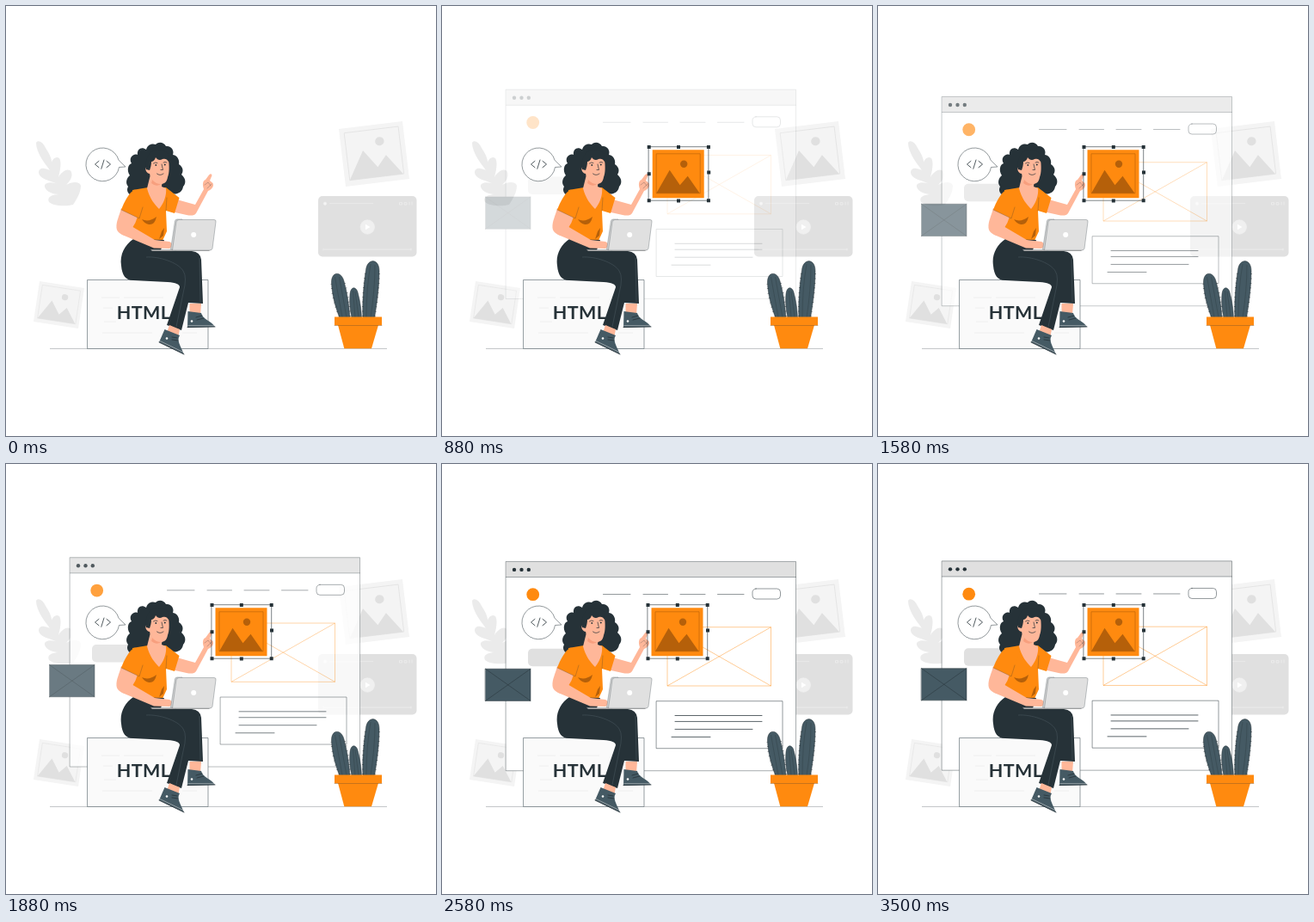
These frames come from a looping animation (500 by 500 pixels, 3540 ms). An HTML page:

```html
<!DOCTYPE html>
<html lang="en">
<head>
<meta charset="utf-8">
<title>Building a web page</title>
<style>
  html, body { margin: 0; width: 100%; height: 100%; overflow: hidden; background: #fff; }
  svg { display: block; width: 100%; height: 100%; }
  .ink { fill: none; stroke: #263238; stroke-width: .5; stroke-linecap: round; stroke-linejoin: round; }
  .dark { fill: #263238; }
  .slate { fill: #455a64; }
  .orange { fill: #ff8a0f; }
  .skin { fill: #ffb799; }
  .grey { fill: #e0e0e0; }
  .card { fill: #f4f4f4; color: #e0e0e0; }
</style>
</head>
<body>
<svg viewBox="0 0 500 500">
  <defs>
    <g id="photo">
      <path d="M0 0H60V56H0Z"/>
      <g fill="currentColor">
        <path d="M4.500 50.500L20 23.500L32 41L41 30.500L55 50.500Z"/>
        <circle cx="36.500" cy="16.500" r="4.200"/>
      </g>
      <path d="M4.500 4.500H55.500V50.500H4.500Z" fill="none" stroke="currentColor" stroke-width=".6"/>
    </g>
  </defs>

  <!-- background -->
  <use href="#photo" class="card" transform="matrix(1.233 -.15 .143 1.196 387 143)"/>
  <use href="#photo" class="card" transform="matrix(.867 .133 -.125 .84 39 320)"/>
  <path fill="#ebebeb" d="M35 159C37 155 43 158 46 165C51 173 55 180 52 186C53 178 58 174 62 177C65 182 63 191 61 199C66 191 73 188 76 193C78 199 74 204 70 208C77 204 86 204 87 209C87 217 82 225 78 231C70 233 56 233 50 228C47 222 54 219 62 219C52 219 44 214 45 208C48 204 55 205 60 207C51 203 39 201 38 194C38 187 45 188 51 191C46 184 35 171 35 159Z"/>
  <rect class="grey" x="363" y="221" width="114.500" height="70.500" rx="5"/>
  <g fill="#f5f5f5" stroke="#f0f0f0" stroke-width=".7">
    <circle cx="371" cy="229.700" r="1.700"/>
    <circle cx="420.300" cy="257" r="8.200" fill="#f0f0f0"/>
    <path d="M376 229.700H427M370 283H471M457.500 228.500h3v2.500h-3zM463 228.500h3v2.500h-3zM469 227.500v4M472 227.500v4M369 281.500v3M471 281.500v3" fill="none"/>
  </g>
  <path d="M418 253.800V260.200L423.500 257Z" fill="#fff"/>
  <path d="M51 398.500H443" stroke="#b5b9bb" stroke-width=".8"/>

  <!-- browser window -->
  <g id="page">
    <path d="M74.500 112.700H411.500V356H74.500Z" fill="#fff"/>
    <path class="grey" d="M74.500 112.700H411.500V130.800H74.500Z"/>
    <path class="ink" stroke-opacity=".8" d="M74.500 112.700H411.500V356H74.500ZM74.500 130.800H411.500"/>
    <g class="dark">
      <circle cx="84" cy="122.200" r="2.200"/>
      <circle cx="92.500" cy="122.200" r="2.200"/>
      <circle cx="100.800" cy="122.200" r="2.200"/>
    </g>
    <circle class="orange" cx="105.700" cy="151" r="7.400"/>
    <path class="ink" d="M187.500 150.800H219M234 150.800H262.500M277 150.800H306M320.500 150.800H351"/>
    <rect class="ink" x="361" y="144.300" width="32.500" height="12" rx="4"/>
    <rect class="grey" x="100" y="214" width="62" height="20.500" rx="5"/>
    <path d="M262 189H382.500V257.300H262ZL382.500 257.300M262 257.300L382.500 189" fill="none" stroke="#ff8a0f" stroke-width=".55" stroke-opacity=".8"/>
    <path class="ink" d="M249.500 275H396V330H249.500Z"/>
    <path class="ink" style="stroke-width:.75" d="M271 291.800H372M271 298.700H372M271 307.700H361M267 316.700H312"/>
    <path class="slate" d="M50.500 237.500H103V274.700H50.500Z"/>
    <path class="ink" d="M50.500 237.500H103V274.700H50.500ZL103 274.700M50.500 274.700L103 237.500"/>
  </g>

  <!-- seat -->
  <path d="M94.500 318.500H235V398.500H94.500Z" fill="#fafafa" stroke="#536067" stroke-width=".6"/>
  <path d="M111 339H132M137 339H183M113 351H124M114 367H128M112 380H170M205 380H222" stroke="#ececec" stroke-width=".8"/>
  <text class="dark" x="128.800" y="364.300" font-family="Lato, sans-serif" font-weight="700" font-size="21.500" letter-spacing=".4">HTML</text>

  <!-- cactus -->
  <g class="slate" stroke="#263238" stroke-width=".5">
    <path d="M415 363C414 345 416 322 418.500 307C420 293 434 293 434 308C434 328 431 347 428.500 363Z"/>
    <path d="M388 363C383 350 379 336 378.500 322C378 308 390 308 393 320C397 334 399 349 400 363Z"/>
    <path d="M402 363C400 353 399 344 400 335C401 325 408 326 409.500 335C412 344 413 353 413.500 363Z"/>
    <path fill="none" stroke-opacity=".6" d="M419 362Q419 328 424 300M424 362Q429 330 429 301M391 362L382.500 315M396 362L387.500 315M406 362L403.500 331M410 362L406 332"/>
    <path fill="none" stroke-width="2" stroke-dasharray=".5 5" d="M415 361Q414.500 332 418.500 307M428.700 361Q434 330 434 308M387.500 361Q379 340 378.500 323M400 361Q399 338 393 320"/>
  </g>
  <path class="orange" d="M386 371L393.300 398.300H425L433 371Z"/>
  <path class="orange" d="M382 361.500H437V371.500H382Z"/>
  <path class="ink" stroke-opacity=".5" d="M382 371.500H437"/>

  <!-- speech bubble -->
  <path class="ink" style="fill:#fff" d="M131 179A19.400 19.400 0 1 0 131.500 187.500L138.500 187Z"/>
  <path class="ink" style="stroke-width:.8" d="M108 180.300L103.500 184L108 187.800M117 180.300L121.500 184L117 187.800M114 179L110.800 189.300"/>

  <!-- woman -->
  <path class="dark" d="M163 167C165 160 171 160 174 161C178 157 184 159 186 163C192 162 196 168 194 173C200 174 202 180 201 184C207 188 206 193 204 196C210 201 209 207 206 210C205 217 198 220 192 218C185 219 181 214 180 211L166 215C163 224 155 224 151 220C143 222 139 215 142 210C138 205 141 199 144 197C140 191 142 184 146 183C142 177 148 171 153 173C152 166 158 163 163 167Z"/>
  <path class="skin" d="M195 224L220 231L230 213C228 207 229 203 232 202L236 196.500Q239 194 239.500 197L237 203L240.500 206C242 209 240 213 235 215L221 241C219 244 215 244 210 243L192 239Z"/>
  <path class="ink" stroke-opacity=".5" d="M231 208L235 205L238 209M234 212L239 207"/>
  <path class="orange" d="M165 211L147 214L146 250L150 275L181 275L187 262L186 238L196 241L201.500 223L186 211Z"/>
  <path class="skin" d="M168 196L164 212C167 224 173 231 178 236C184 229 187 219 186 212L181 210L182 200Z"/>
  <path class="skin" d="M166 178C170 173 186 173 189 178C190 187 190 194 188 199C187 205 184 207 180 207C174 207 168 201 167 195C161 194 161 185 166 187Z"/>
  <path class="dark" d="M163 190C161 176 168 167 177 167C187 167 192 174 189.500 182C188 178 185 177 182 178C179 180 176 179 174 176C173 180 170 181 169 181C169 185 168 188 167 191Z"/>
  <path class="ink" style="stroke-width:.7" d="M171.500 183Q174 181 176 182.500M183 182Q185 180.500 187 182M181 184L182.500 190.500H180M175.500 195Q179 198 183 195"/>
  <g class="dark">
    <circle cx="174.300" cy="185" r=".9"/>
    <circle cx="184.800" cy="184.500" r=".9"/>
  </g>
  <path d="M170 202Q174 207 180 207Q175 211 169 206Z" fill="#f28f6c" opacity=".6"/>
  <path d="M158 248Q166 252 175 245Q173 255 166 254Q161 253 158 248ZM181 262L184 258L183 267L178 271Z" fill="#b5600a"/>
  <path class="ink" stroke-opacity=".5" d="M186 238L187 223"/>

  <path class="dark" d="M148 271C138 278 132 289 134 302C135 313 139 319 148 319L188 321Q202 322 202 327L187 371L204 377L212 345L229 346L227 295Q226 286 216 285L180 284L184 272Z"/>
  <path d="M163 292C178 291 200 298 206 308Q211 315 206 334L198 373M225 293L226 344" fill="none" stroke="#56666e" stroke-width=".4"/>
  <path class="skin" d="M134 235C132 244 128 250 128.500 258C129 264 135 266 141 268.500L172 281.500L190 282C194 280 194 276 190 274L173 272L147.500 257Q151 252 153 245Z"/>
  <path class="orange" d="M150 213.500C143 216 137 229 134 237L155 247L163 224Z"/>
  <path class="ink" stroke-opacity=".5" d="M134 237L155 247L159 234"/>
  <path class="skin" d="M190 371L202 376L200 386L187 380ZM213.500 346L227 346L226 359L213.500 359Z"/>
  <path class="slate" d="M184.500 376L202 383C198 389 203 395 207 405L178 391ZM211.500 355L227 357C229 365 239 366 243 373L211 374Z"/>
  <path class="ink" style="stroke-width:.8" d="M178 391L207 405M211 373.500L243 373M193 385L199 386M193 388L200 389M221 362L228 360M222 365L230 363"/>
  <path d="M179 389.500L206 402.500M211.500 371.700H242" stroke="#e0e0e0" stroke-width=".5"/>
  <g fill="#fff">
    <circle cx="187" cy="386.500" r="1.300"/>
    <circle cx="216" cy="366.500" r="1.300"/>
  </g>

  <!-- laptop -->
  <path d="M168 283.300H238L236 285H170Z" fill="#a6a6a6"/>
  <g stroke="#7d8589" stroke-width=".5">
    <path d="M191.500 283L196.500 250Q197 248 199 248H205L198 284Z" fill="#d2d2d2"/>
    <path class="grey" d="M193.500 284L198 251Q198.500 248.500 201 248.500H242Q244.500 248.500 244 251L240 282Q239.500 284 237 284Z"/>
  </g>
  <circle cx="218.200" cy="266" r="3" fill="#fff"/>

  <!-- selected picture -->
  <g id="picture">
    <use href="#photo" class="orange" color="#b5600a" x="243.500" y="167.300"/>
    <path class="ink" style="stroke-width:.6" d="M239.300 163.700H308.700V226.200H239.300Z"/>
    <path class="dark" d="M237.500 162h4v4h-4zM271.800 162h4v4h-4zM306.700 162h4v4h-4zM237.500 193.300h4v4h-4zM307 191.500h4v4h-4zM237.500 224.300h4v4h-4zM271.800 224.500h4v4h-4zM306.700 224.300h4v4h-4z"/>
  </g>
</svg>
<script>
  const LOOP = 3540, TRAVEL = 20;
  const page = document.getElementById('page');
  const picture = document.getElementById('picture');

  const bezier = (s, a, b) => 3 * (1 - s) ** 2 * s * a + 3 * (1 - s) * s * s * b + s ** 3;

  // Cubic bezier easing (.36, -.01, .5, 1.38) with a small overshoot.
  function ease(x) {
    if (x >= 1) return 1;
    let low = 0, high = 1;
    for (let i = 0; i < 24; i++) {
      const mid = (low + high) / 2;
      if (bezier(mid, .36, .5) < x) low = mid; else high = mid;
    }
    return bezier(low, -.01, 1.38);
  }

  function enter(group, progress, dx, dy) {
    const rest = (1 - progress) * TRAVEL;
    group.setAttribute('opacity', Math.min(1, Math.max(0, progress)));
    group.setAttribute('transform', `translate(${-dx * rest} ${-dy * rest})`);
  }

  function draw() {
    const t = performance.now() % LOOP;
    enter(page, ease(t / LOOP), 0, 1);
    enter(picture, ease(t / 1000), 1, 0);
    requestAnimationFrame(draw);
  }
  draw();
</script>
</body>
</html>
```
